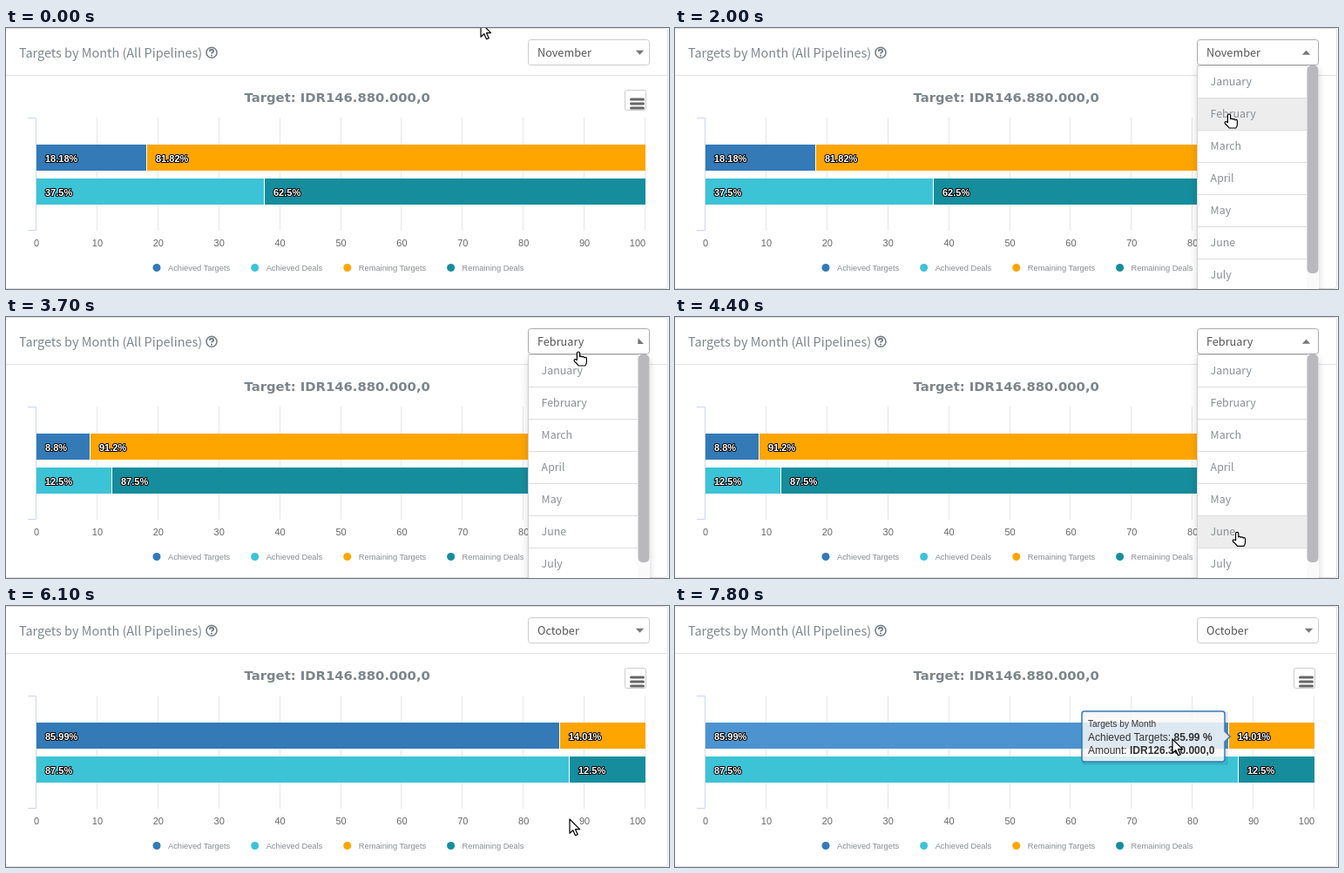
An HTML page that plays this animation: 761 px wide and 300 px high, repeating every 8000 ms.

```html
<!DOCTYPE html>
<html lang="en">
<head>
<meta charset="utf-8">
<title>Targets by Month</title>
<style>
  html, body { margin: 0; width: 100%; height: 100%; overflow: hidden; background: #fff; }
  svg { display: block; }
  text { font-family: "Liberation Sans", Arial, sans-serif; }
  .ui { font-family: "Noto Sans CJK SC", "Noto Sans CJK JP", "Noto Sans", sans-serif; }
  .head { font-size: 14.45px; fill: #7d878d; }
  .pick { font-size: 12.7px; fill: #555; }
  .month { font-size: 12.4px; font-weight: 300; fill: #8a8f93; }
  .title { font: bold 14.8px "DejaVu Sans", sans-serif; fill: #7b858b; text-anchor: middle; }
  .tick { font-size: 11px; fill: #666; text-anchor: middle; }
  .key { font-size: 9.3px; fill: #868c91; }
  .value { font-size: 11px; font-weight: bold; fill: #fff; stroke: #000; stroke-width: 2px;
    stroke-linejoin: round; paint-order: stroke; }
  .tip text { font-size: 12px; fill: #333; }
  .tip .small { font-size: 10.2px; }
  .tip tspan { font-weight: bold; }
  .bars { transform-origin: 34.5px 0; }
  #caret { transform-origin: 726px 28.3px; }
  #shade { filter: blur(4px); }
</style>
</head>
<body>
<svg width="761" height="300" viewBox="0 0 761 300">
  <rect x="-5.5" y=".5" width="765" height="299" rx="3" fill="#fff" stroke="#ddd"/>
  <path d="M0 54.5H759" stroke="#e2e2e2"/>
  <text class="ui head" x="15" y="34">Targets by Month (All Pipelines)</text>
  <g fill="none" stroke="#76808a">
    <circle cx="236" cy="28.3" r="6" stroke-width="1.6"/>
    <path d="M233.9 27q0-2.2 2.1-2.2t2.1 1.9q0 1.2-1.2 1.7-.9.4-.9 1.2M236 30.7v1.8" stroke-width="1.9"/>
  </g>

  <g id="chart">
    <text class="title" x="380.2" y="85">Target: IDR146.880.000,0</text>
    <rect x="710.5" y="71.5" width="24" height="23" rx="2" fill="#fff" stroke="#ccc"/>
    <path d="M717.5 82h14m-14 5h14m-14 5h14" stroke="#666" stroke-width="3" stroke-linecap="round"/>
    <g id="axis"><path d="M25 103.5H34.5V232.5H25" fill="none" stroke="#ccd6eb"/></g>
    <g id="plots"></g>
    <g id="legend"></g>
  </g>
  <g id="tips"></g>

  <rect id="box" x="599.5" y="13.5" width="139" height="29" rx="3" fill="#fff"/>
  <text id="pick" class="ui pick" x="610" y="33"></text>
  <path id="caret" d="M722.8 25.8h9.4l-4.7 5z" fill="#777"/>
  <g id="menu">
    <path id="shade" d="M599 47H739V320H599z" opacity=".16"/>
    <svg x="599" y="43" width="140" height="257">
      <rect width="140" height="257" fill="#fff"/>
      <g id="list"><rect id="hover" x="1" width="126" height="37" fill="#ededed"/></g>
      <path d="M126 0h14v257h-14z" fill="#fafafa"/>
      <rect id="thumb" x="126.5" width="13" height="239" rx="5" fill="#b9b9bd"/>
      <path d="M.5 0V257M0 .5H127" stroke="#d4d4d4"/>
    </svg>
  </g>

  <g id="cursor" stroke="#000" stroke-width="1.2" fill="#fff" stroke-linejoin="round">
    <path id="arrow" d="M0 0V16.2L3.8 12.7 6.5 18.8 9.2 17.6 6.5 11.7H11.6Z"/>
    <path id="hand" d="M-1.6 9.5V1.6Q-1.6 0 0 0T1.6 1.6V5.6Q3 4.4 4.2 6 6 4.8 7 6.8 9.2 5.4 9.4 8V11.5Q9.4 14 7.8 16H.2Q-1 14-4.6 11-5.4 9.4-4.2 8.8-3 8.4-1.6 9.5Z"/>
  </g>
</svg>
<script>
const LOOP = 8000, LEFT = 34.5, SPAN = 699, ROW = 37, LIST_TOP = 43, SCROLL = 110;
const MONTHS = ['January', 'February', 'March', 'April', 'May', 'June', 'July', 'August',
  'September', 'October', 'November', 'December'];
const SERIES = {
  'Achieved Targets': '#337ab7', 'Achieved Deals': '#3dc3d6',
  'Remaining Targets': '#ffa500', 'Remaining Deals': '#168d9c'
};
const [BLUE, CYAN, ORANGE, TEAL] = Object.values(SERIES);

// Each choice: list opens, month is picked, chart is drawn again
const choices = [
  { name: 'November', targets: 18.18, deals: 37.5, open: -LOOP, pick: -LOOP, drawn: -LOOP },
  { name: 'February', targets: 8.8, deals: 12.5, open: 1060, pick: 2090, drawn: 2690 },
  { name: 'October', targets: 85.99, deals: 87.5, open: 3662, pick: 5390, drawn: 5690 }
];
// Pointer stops: leave the last one, arrive, x, y
const stops = [
  { from: 0, to: 0, x: 545, y: -6 },
  { from: 280, to: 800, x: 630, y: 23 },
  { from: 1150, to: 1900, x: 636, y: 99 },
  { from: 2200, to: 3100, x: 657, y: 27 },
  { from: 3610, to: 3690, x: 657, y: 40 },
  { from: 3720, to: 4450, x: 645, y: 250 },
  { from: 5000, to: 5280, x: 649, y: 290 },
  { from: 5430, to: 6000, x: 647, y: 245 },
  { from: 6300, to: 7200, x: 571, y: 153 }
];

const $ = id => document.getElementById(id);
const add = (id, markup) => {
  $(id).insertAdjacentHTML('beforeend', markup);
  return $(id).lastElementChild;
};
const show = (el, on) => el.style.opacity = +on;
const move = (el, x, y) => el.setAttribute('transform', `translate(${x} ${y})`);
const ramp = (t, from, to) => Math.min(1, Math.max(0, (t - from) / (to - from || 1)));
const smooth = (t, from, to) => { const u = ramp(t, from, to); return u * u * (3 - 2 * u); };
const scrolled = t => SCROLL * ramp(t, 4500, 5000);

function pointer(t) {
  const i = stops.findLastIndex(s => s.from <= t);
  const b = stops[i], a = stops[i - 1] || b, u = smooth(t, b.from, b.to);
  return { x: a.x + (b.x - a.x) * u, y: a.y + (b.y - a.y) * u };
}
// When the last move passes a height on its way up
function passes(y) {
  let t = stops.at(-1).from;
  while (pointer(t).y > y) t += 10;
  return t;
}
const dealsIn = passes(203), dealsOut = passes(173), targetsIn = passes(164) + 60;

// Chart
const snap = p => Math.floor(LEFT + SPAN * p) + .5;
for (let i = 0; i <= 10; i++) {
  if (i) add('axis', `<path d="M${snap(i / 10)} 103V233" stroke="#e6e6e6"/>`);
  add('axis', `<text class="tick" x="${Math.min(725, 35 + i * 69.9)}" y="251">${i * 10}</text>`);
}

let keyX = 173;
for (const [name, fill] of Object.entries(SERIES)) {
  add('legend', `<circle cx="${keyX}" cy="275.5" r="4.5" fill="${fill}"/>`);
  const label = add('legend', `<text class="key" x="${keyX + 13}" y="279">${name}</text>`);
  keyX += 41.5 + label.getComputedTextLength();
}

function bars(y, pct, a, bright, b) {
  const x = snap(pct / 100), first = `<rect x="35" y="${y}" width="${x - 35}" height="30"`;
  return `${first} fill="${a}"/>${first} fill="${bright}" class="glow" opacity="0"/>
    <rect x="${x}" y="${y}" width="${734 - x}" height="30" fill="${b}"/>
    <path d="M${x} ${y}v30" stroke="#fff"/>`;
}
const values = (y, pct) => `<text class="value" x="45" y="${y}">${pct}%</text>
  <text class="value" x="${snap(pct / 100) + 10.5}" y="${y}">${+(100 - pct).toFixed(2)}%</text>`;
for (const c of choices) {
  c.plot = add('plots', `<g>
    <g class="bars">${bars(134, c.targets, BLUE, '#4c93d0', ORANGE)}${bars(173, c.deals, CYAN, '#56dcef', TEAL)}</g>
    <g>${values(154, c.targets)}${values(193, c.deals)}</g></g>`);
}
const [targetGlow, dealGlow] = choices.at(-1).plot.querySelectorAll('.glow');

// Tooltips
const tip = (x, y, w, name, value, amount) => add('tips', `<g class="tip">
  <path d="M${x + 2} ${y + 2}h${w}v58h${-w}z" fill="none" stroke="#000" stroke-width="3" opacity=".1"/>
  <path d="M${x + 3} ${y}h${w - 6}q3 0 3 3v20l6 6-6 6v20q0 3-3 3h${6 - w}q-3 0-3-3v-52q0-3 3-3z"
    fill="#f7f7f7" fill-opacity=".85" stroke="${SERIES[name]}" stroke-width="1.5"/>
  <text class="small" x="${x + 7}" y="${y + 18}">Targets by Month</text>
  <text x="${x + 7}" y="${y + 34}">${name}: <tspan>${value} %</tspan></text>
  <text x="${x + 7}" y="${y + 49}">Amount: <tspan>${amount}</tspan></text></g>`);
const dealTip = tip(496, 159, 146, 'Achieved Deals', 87.5, 7);
const targetTip = tip(467, 121, 164, 'Achieved Targets', 85.99, 'IDR126.300.000,0');

// Month list
MONTHS.forEach((name, i) => add('list', `<path d="M1 ${ROW * i + 37.5}h126" stroke="#ddd"/>
  <text class="ui month" x="15.6" y="${ROW * i + 23}">${name}</text>`));

function draw(t) {
  const now = choices.findLast(c => c.pick <= t);
  const open = choices.some(c => c.open <= t && t < c.pick);
  const { x, y } = pointer(t), scroll = scrolled(t);

  show($('chart'), t >= now.drawn);
  for (const c of choices) {
    show(c.plot, c === now);
    const [shapes, labels] = c.plot.children;
    shapes.style.transform = `scaleX(${smooth(t, c.drawn, c.drawn + 280)})`;
    show(labels, ramp(t, c.drawn + 240, c.drawn + 390));
  }

  show(dealTip, t >= dealsIn && t < targetsIn);
  show(targetTip, t >= targetsIn);
  const slide = (1 - ramp(t, targetsIn, targetsIn + 300)) ** 3;
  move(targetTip, 16 * slide, 38 * slide);
  show(dealGlow, ramp(t, dealsIn, dealsIn + 100) - ramp(t, dealsOut, dealsOut + 100));
  show(targetGlow, ramp(t, targetsIn, targetsIn + 150));

  $('pick').textContent = now.name;
  $('box').setAttribute('stroke', open ? '#aaa' : '#ccc');
  const turns = choices.reduce((sum, c) => sum + ramp(t, c.open, c.open + 150) - ramp(t, c.pick, c.pick + 150), 0);
  $('caret').style.transform = `rotate(${180 * turns}deg)`;

  show($('menu'), open);
  const row = Math.floor((y - LIST_TOP + scroll) / ROW);
  move($('hover'), 0, ROW * Math.max(-1, row));
  move($('list'), 0, -scroll);
  move($('thumb'), 0, scroll * 94 / SCROLL);

  const hand = t < 5200 && (open || (y > 13 && y < LIST_TOP && x > 599));
  move($('cursor'), x, y);
  show($('arrow'), !hand);
  show($('hand'), hand);
}

const start = performance.now();
(function frame() {
  draw((performance.now() - start) % LOOP);
  requestAnimationFrame(frame);
})();
</script>
</body>
</html>
```
